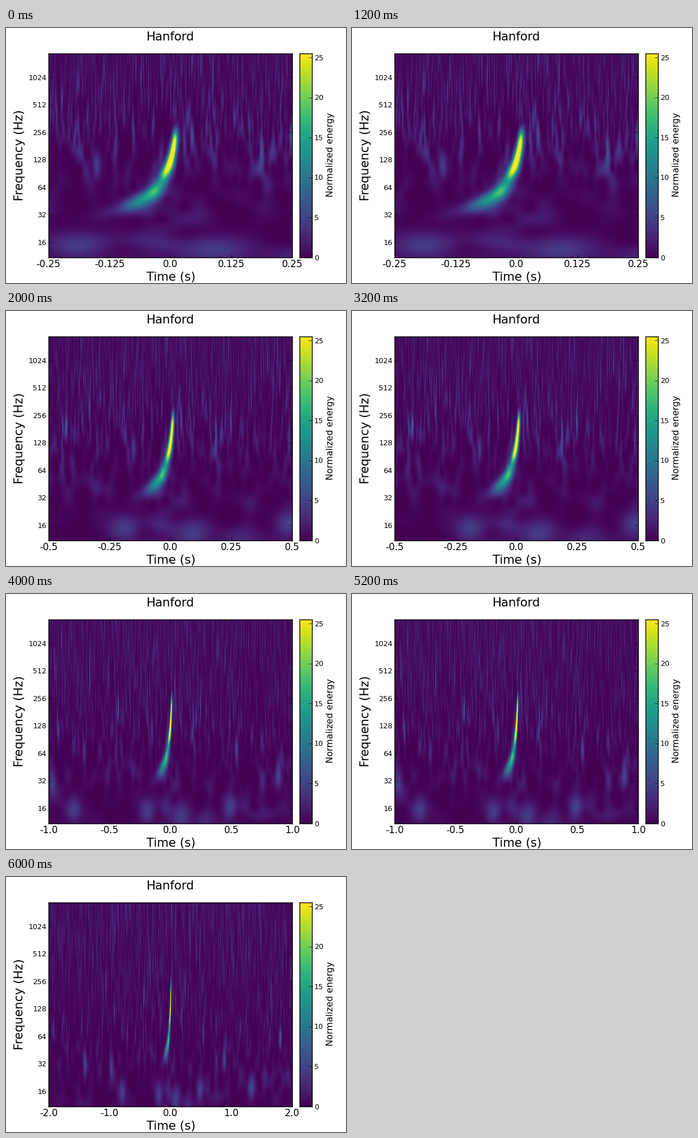
These frames come from a looping animation (600 px wide and 450 px high, 8 s). A matplotlib script:

```python
import numpy as np
import matplotlib.pyplot as plt
from matplotlib.animation import FuncAnimation

W, H, DPI = 600, 450, 100
LEFT, RIGHT, TOP, BOTTOM = 75, 505, 45, 405
VMAX = 25.5
OCTAVE = 48.5      # pixels per octave
Y_16HZ = 378.4
RATE, DURATION = 4096, 4
HALF_SPANS = [0.25, 0.5, 1.0, 2.0]

rows = np.arange(TOP, BOTTOM) + 0.5
octave = 4 + (Y_16HZ - rows) / OCTAVE
freqs = 2 ** octave

# Loudest noise bursts: time (s), frequency (Hz)
BURSTS = [(-1.4, 30), (-0.97, 31), (-0.79, 15.6), (-0.19, 15), (0.092, 13.3),
          (0.487, 16.5), (1.33, 17.5), (0.89, 37), (0.543, 70),
          (-0.151, 112), (0.044, 250), (0.0345, 360)]


def noise_energy():
    """Energy of white noise through bands proportional to frequency."""
    rng = np.random.default_rng(14)
    n = RATE * DURATION
    bins = np.arange(n // 2) / DURATION
    spectrum = rng.normal(size=n // 2) + 1j * rng.normal(size=n // 2)
    blur = np.hanning(11)
    blur /= blur.sum()
    energy = np.empty((len(rows), n), dtype=np.float32)
    for i, f in enumerate(freqs):
        sigma = f * (0.13 + 0.017 * octave[i])
        window = np.exp(-0.5 * ((bins - f) / sigma) ** 2)
        line = np.abs(np.fft.ifft(spectrum * window, n)) ** 2
        energy[i] = np.convolve(line / line.mean(), blur, mode="same")
    level = np.interp(octave, [5, 7, 10], [0.5, 0.75, 1.05])
    return energy * level[:, None]


def chirp_energy(t):
    """Ridge that sweeps upward and shortens, loud at the top, softer below."""
    period = 64 / freqs
    offset = 16 - 43 * period ** 1.5
    width = 4.5 + 13 * period ** 1.7
    peak = (30 * np.exp(-((octave - 7.2) / 0.85) ** 4)
            + 17 * np.exp(-((octave - 5.8) / 0.52) ** 2))
    return peak[:, None] * np.exp(-((t * 1000 - offset[:, None]) / width[:, None]) ** 2)


def burst_energy(t):
    return sum(4.5 * np.outer(np.exp(-((octave - np.log2(f)) / 0.45) ** 2),
                              np.exp(-((t - when) * f / 0.9) ** 2))
               for when, f in BURSTS)


def spectrogram(noise, half):
    columns = RIGHT - LEFT
    t = ((np.arange(columns) + 0.5) / columns * 2 - 1) * half
    index = ((t + DURATION / 2) * RATE).astype(int)
    return noise[:, index] + burst_energy(t) + chirp_energy(t)


def pixel_axes(left, right):
    ax = fig.add_axes([left / W, 1 - BOTTOM / H, (right - left) / W, (BOTTOM - TOP) / H])
    for spine in ax.spines.values():
        spine.set_linewidth(1)
    ax.tick_params(direction="in", length=4, width=0.5,
                   labelleft=False, labelbottom=False)
    return ax


def label(x, y, text, size, ha="center", rotation=0):
    return fig.text(x / W, 1 - y / H, text, fontsize=size, ha=ha, va="baseline",
                    rotation=rotation, rotation_mode="anchor")


plt.rcParams["font.family"] = "DejaVu Sans"
fig = plt.figure(figsize=(W / DPI, H / DPI), dpi=DPI, facecolor="white")

noise = noise_energy()
views = [spectrogram(noise, half) for half in HALF_SPANS]

ax = pixel_axes(LEFT, RIGHT)
image = ax.imshow(views[0], cmap="viridis", vmin=0, vmax=VMAX, aspect="auto",
                  interpolation="nearest", extent=(0, 4, BOTTOM, TOP))
tick_octaves = range(4, 11)
tick_rows = [Y_16HZ - (k - 4) * OCTAVE for k in tick_octaves]
ax.set_xticks(range(5))
ax.set_yticks(tick_rows)
ax.tick_params(top=True, right=True)

bar = pixel_axes(518, 540)
bar.imshow(np.linspace(0, VMAX, 256)[:, None], cmap="viridis", aspect="auto",
           origin="lower", interpolation="nearest", extent=(0, 1, 0, VMAX))
bar.set_xticks([])
bar.set_yticks(range(0, 26, 5))
bar.tick_params(left=False, right=True)

label(290.6, 22, "Hanford", 15.3)
label(291, 446, "Time (s)", 15.3)
label(29.7, 224.8, "Frequency (Hz)", 15.4, rotation=90)
label(577, 224, "Normalized energy", 11.3, rotation=90)
for k, y in zip(tick_octaves, tick_rows):
    label(71.5, y + 4.2, str(2 ** k), 9.2, ha="right")
for value in range(0, 26, 5):
    y = BOTTOM - value / VMAX * (BOTTOM - TOP)
    label(543.8, y + 4.6, str(value), 9.2, ha="left")
time_labels = [label(LEFT + k * (RIGHT - LEFT) / 4, 421.5, "", 12) for k in range(5)]


def update(frame):
    image.set_data(views[frame])
    for k, text in enumerate(time_labels):
        text.set_text(str(HALF_SPANS[frame] * (k / 2 - 1)).replace("-0.0", "0.0")
                      if k == 2 else str(HALF_SPANS[frame] * (k / 2 - 1)))
    return [image, *time_labels]


anim = FuncAnimation(fig, update, frames=4, interval=2000, repeat=True, blit=False)
plt.show()
```
